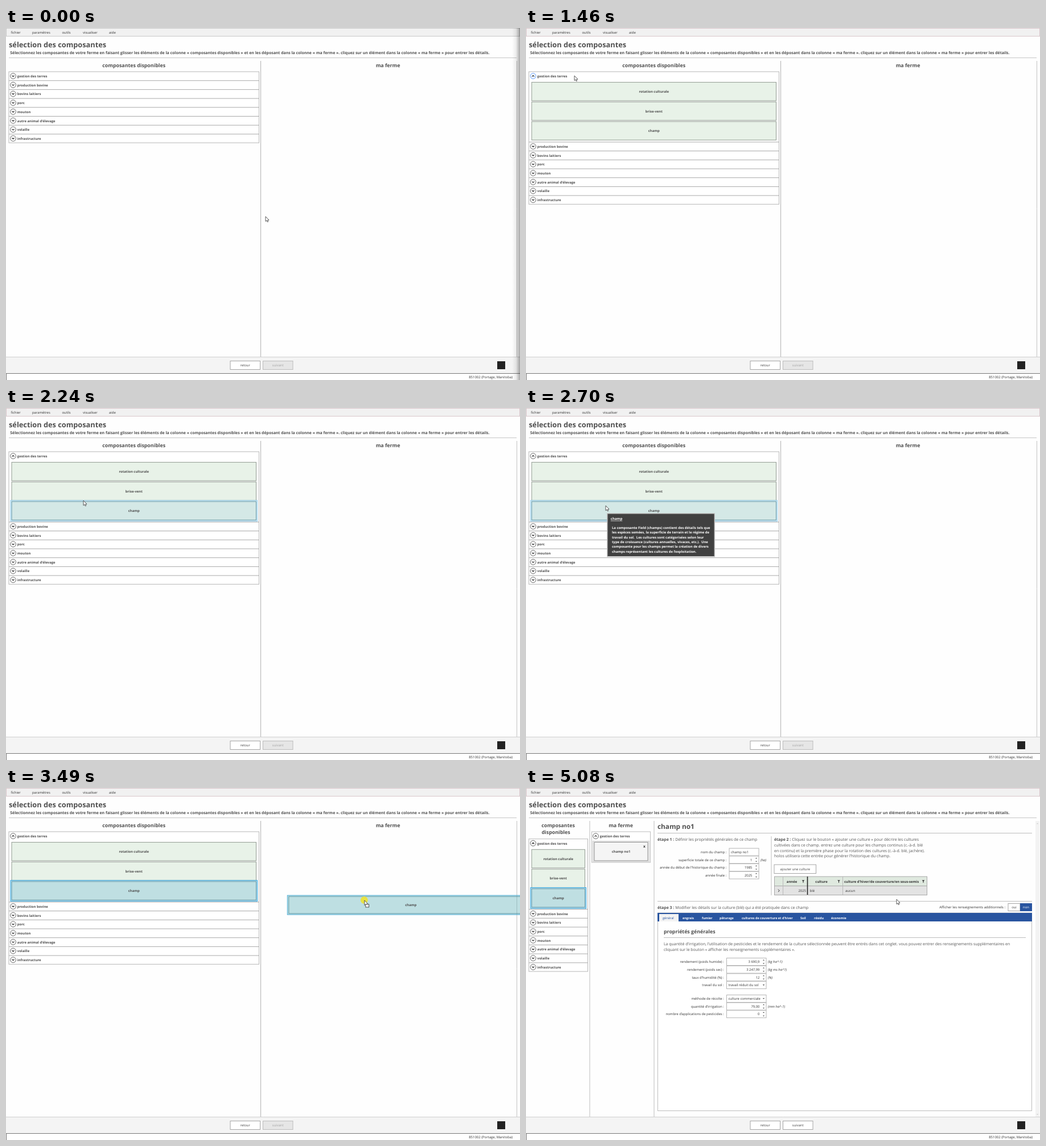
An HTML page with a canvas that plays this animation: 903x620 px, repeating every 6400 ms.

```html
<!DOCTYPE html>
<html lang="fr">
<head>
<meta charset="utf-8">
<title>Sélection des composantes</title>
<style>
html, body { margin: 0; width: 100%; height: 100%; overflow: hidden; background: #fff; }
canvas { display: block; width: 903px; height: 620px; }
</style>
</head>
<body>
<canvas id="stage"></canvas>
<script>
const W = 903, H = 620, LOOP = 6400;
const canvas = document.getElementById('stage');
const dpr = window.devicePixelRatio || 1;
canvas.width = W * dpr;
canvas.height = H * dpr;
const ctx = canvas.getContext('2d');
ctx.scale(dpr, dpr);
ctx.textRendering = 'geometricPrecision';
ctx.textBaseline = 'alphabetic';

const INK = '#505050', DARK = '#333', LINE = '#bdbdbd', BLUE = '#2955a0';
const PRESS = 1320, OPEN = 1400, TIP = 2700, GRAB = 2770, DRAG = 2900;
const RELEASE = 3950, DROP = 4550, IDLE = 4620, FORM = 5080;

// Bursts of motion: start, end, number of steps
const bursts = [[270, 850, 10], [920, 1460, 9], [1640, 2240, 10], [2300, 2440, 3], [2700, 3300, 10], [3360, 3630, 5]];
// Pointer path: time, x, y
const path = [
  [205, 456, 332], [850, 112, 111], [1050, 102, 94], [1380, 85, 84], [1590, 85, 84],
  [1970, 116, 122], [2240, 136, 163], [2440, 140, 172], [2850, 140, 172], [3030, 163, 171],
  [3100, 211, 171], [3300, 468, 189], [3490, 629, 198], [3630, 651, 196]
];

const groups = ['gestion des terres', 'production bovine', 'bovins laitiers', 'porc', 'mouton',
  'autre animal d’élevage', 'volaille', 'infrastructure'];
const parts = ['rotation culturale', 'brise-vent', 'champ'];

function snap(t) {
  let out = 0;
  for (const [start, end, n] of bursts) {
    if (t < start) break;
    const step = (end - start) / (n - 1);
    out = Math.min(end, start + Math.floor((t - start) / step + 0.1) * step);
  }
  return out;
}

function pointer(t) {
  if (t <= path[0][0]) return { x: path[0][1], y: path[0][2] };
  for (let i = 1; i < path.length; i++) {
    const [t0, x0, y0] = path[i - 1], [t1, x1, y1] = path[i];
    if (t > t1) continue;
    let p = (t - t0) / (t1 - t0);
    if (i === 1) p = p * p * (3 - 2 * p);
    return { x: x0 + (x1 - x0) * p, y: y0 + (y1 - y0) * p };
  }
  const last = path[path.length - 1];
  return { x: last[1], y: last[2] };
}

// y is the middle of the lower-case letters
function text(str, x, y, size = 5.95, { bold, italic, align = 'left', color = DARK } = {}) {
  ctx.font = `${italic ? 'italic ' : ''}${bold ? 700 : 400} ${size}px "Open Sans", "Noto Sans", sans-serif`;
  ctx.textAlign = align;
  ctx.fillStyle = color;
  ctx.fillText(str, x, y + size * 0.33);
  return ctx.measureText(str).width;
}

function line(x0, y0, x1, y1, color = LINE, width = 1) {
  ctx.strokeStyle = color;
  ctx.lineWidth = width;
  ctx.beginPath();
  ctx.moveTo(x0, y0);
  ctx.lineTo(x1, y1);
  ctx.stroke();
}

function box(x0, y0, x1, y1, fill, stroke, width = 1) {
  if (fill) {
    ctx.fillStyle = fill;
    ctx.fillRect(x0, y0, x1 - x0, y1 - y0);
  }
  if (stroke) {
    ctx.strokeStyle = stroke;
    ctx.lineWidth = width;
    ctx.strokeRect(x0, y0, x1 - x0, y1 - y0);
  }
}

function shape(points, fill, stroke, width = 0.8) {
  ctx.beginPath();
  points.forEach(([x, y]) => ctx.lineTo(x, y));
  ctx.closePath();
  if (fill) { ctx.fillStyle = fill; ctx.fill(); }
  if (stroke) { ctx.strokeStyle = stroke; ctx.lineWidth = width; ctx.stroke(); }
}

function disc(x, y, r, fill, stroke, width = 0.9) {
  ctx.beginPath();
  ctx.arc(x, y, r, 0, Math.PI * 2);
  if (fill) { ctx.fillStyle = fill; ctx.fill(); }
  if (stroke) { ctx.strokeStyle = stroke; ctx.lineWidth = width; ctx.stroke(); }
}

function triangle(x, y, r, dir, color = DARK) {
  shape([[x - r, y - dir * r / 2], [x + r, y - dir * r / 2], [x, y + dir * r / 2]], color);
}

function button(label, x0, y0, x1, y1, enabled = true) {
  box(x0, y0, x1, y1, enabled ? '#fff' : '#e6e6e6', enabled ? '#a6a6a6' : '#bdbdbd');
  text(label, (x0 + x1) / 2, (y0 + y1) / 2 + 0.3, 5.9, { align: 'center', color: enabled ? '#444' : '#a5a5a5' });
}

function groupHead(label, x, y, open, hot) {
  disc(x, y, 4.9, hot ? '#f3f9ff' : '#fff', hot ? '#5593ff' : '#555');
  const d = open ? -1 : 1;
  ctx.strokeStyle = '#222';
  ctx.lineWidth = 1.1;
  ctx.beginPath();
  ctx.moveTo(x - 2, y - d);
  ctx.lineTo(x, y + d);
  ctx.lineTo(x + 2, y - d);
  ctx.stroke();
  text(label, x + 7.3, y + 0.5, 5.93, { bold: true, color: INK });
}

function partCard(label, x0, y, x1, state) {
  if (state) {
    const picked = state === 'picked';
    box(x0 - 2, y - 2, x1 + 2, y + 34.5, picked ? '#cae8f6' : '#e4f3fa', picked ? '#26a0da' : '#8cc9e8');
  }
  const fill = { picked: '#bfdfe2', hover: '#d4e8e6' }[state] || '#e8f2e8';
  box(x0, y, x1, y + 32.5, fill, state ? '#5f94a3' : '#929b92');
  text(label, (x0 + x1) / 2, y + 16.5, 5.93, { bold: true, align: 'center', color: INK });
}

function partList(top, right, open, pos, stateOf) {
  const pitch = 15.7;
  const shift = open ? 108.2 : 0;
  const bottom = top + pitch * 8 + shift - 0.4;
  box(5, top, right, bottom, '#fff', '#b8b8b8');
  groups.forEach((name, i) => {
    const y = top + pitch * i + (i ? shift : 0);
    if (i) line(5, y, right, y, '#a9a9a9');
    const mid = y + 7.6;
    const hot = pos && pos.x < right && Math.abs(pos.y - mid) < 6;
    groupHead(name, 12.5, mid, open && !i, hot);
  });
  if (open) parts.forEach((name, i) => partCard(name, 10, top + 18.6 + i * 34.6, right - 5, stateOf(i)));
}

function frame(t) {
  const active = t >= PRESS;
  box(0, 0, W, H, '#fefefe');
  box(0.5, 0.5, W - 0.5, 14.5, '#f1f1f1', active ? '#d9c6ca' : '#c9c9c9');
  [['fichier', 8.5], ['paramètres', 46], ['outils', 98.5], ['visualiser', 135], ['aide', 181]]
    .forEach(([s, x]) => text(s, x, 8, 5.9));
  text('sélection des composantes', 5, 29.8, 12.78, { bold: true, color: INK });
  text('Sélectionnez les composantes de votre ferme en faisant glisser les éléments de la colonne « composantes disponibles » et en les déposant dans la colonne « ma ferme ». cliquez sur un élément dans la colonne « ma ferme » pour entrer les détails.',
    7.3, 43.5, 6.92, { bold: true, color: INK });
  line(5, 52.5, 897, 52.5, '#c6c6c6');

  box(0, 579, W, 608, '#f4f4f4');
  line(0, 579.5, W, 579.5, '#cfcfcf');
  box(0.5, 608.5, W + 1, H + 1, '#fff', '#777');
  button('retour', 394, 586.5, 446.5, 601.5);
  button('suivant', 451.5, 586.5, 504, 601.5, t >= FORM);
  box(863, 587, 877, 601, '#222');
  text('851002 (Portage, Manitoba)', 890, 615, 5.97, { align: 'right' });
}

function shadow() {
  const g = ctx.createLinearGradient(889, 0, W, 0);
  g.addColorStop(0, 'rgba(0,0,0,0)');
  g.addColorStop(0.5, 'rgba(0,0,0,.07)');
  g.addColorStop(1, 'rgba(0,0,0,.34)');
  box(889, 0, W, H, g);
}

function heading(str, x, y) {
  text(str, x, y, 8.82, { bold: true, align: 'center', color: INK });
}

function chooser(t, pos) {
  heading('composantes disponibles', 224.7, 65.8);
  heading('ma ferme', 671, 65.8);
  line(447.5, 58, 447.5, 579, '#bababa', 1.2);
  line(897.5, 58, 897.5, 579, '#c2c2c2');
  const stateOf = i => {
    if (t >= GRAB) return i === 2 ? 'picked' : '';
    return Math.floor((pos.y - 93.5) / 34.6) === i ? 'hover' : '';
  };
  partList(77, 444.5, t >= OPEN, t < GRAB ? pos : null, stateOf);
}

function tooltip() {
  box(142.8, 185.8, 331.3, 261.7, '#404040', '#c4c4c4', 1.4);
  const white = { bold: true, color: '#fff' };
  const w = text('champ', 148.8, 195.2, 6.05, white);
  line(148.8, 198.8, 148.8 + w, 198.8, '#fff', 0.7);
  ['La composante Field (champs) contient des détails tels que',
    'les espèces semées, la superficie de terrain et le régime de',
    'travail du sol.  Les cultures sont catégorisées selon leur',
    'type de croissance (cultures annuelles, vivaces, etc.).  Une',
    'composante pour les champs permet la création de divers',
    'champs représentant les cultures de l’exploitation.'
  ].forEach((s, i) => text(s, 151, 211.2 + i * 8.3, 5.89, white));
}

function ghost(x, y) {
  box(x, y, x + 434, y + 34, 'rgba(111,184,191,.45)', '#4fafd8');
  box(x + 2.5, y + 2, x + 431.5, y + 32, null, 'rgba(60,130,150,.75)');
  text('champ', x + 217, y + 17.2, 5.93, { bold: true, align: 'center', color: INK });
}

function arrow(x, y) {
  const pts = [[0, 0], [0, 8.6], [2, 6.9], [3.3, 9.7], [4.7, 9.1], [3.5, 6.4], [6, 6.2]];
  shape(pts.map(([a, b]) => [x + a, y + b]), '#fff', '#333');
}

function cursor(t, pos) {
  const { x, y } = pos;
  const pressed = (t >= PRESS && t < OPEN) || (t >= GRAB && t < RELEASE);
  if (pressed) disc(x - 0.5, y - 0.5, 6.4, 'rgba(240,228,40,.85)');
  const dragging = t >= DRAG && t < IDLE;
  if (dragging && x < 447) {
    disc(x, y - 0.5, 3.8, null, '#f4ecb0', 2);
    disc(x, y - 0.5, 3.8, null, '#8f8447', 0.8);
    line(x - 2.7, y - 3.2, x + 2.7, y + 2.2, '#8f8447', 0.9);
    return;
  }
  arrow(x, y);
  if (dragging) box(x + 2, y + 7, x + 7.8, y + 12, '#fff', '#444', 0.9);
}

function field(label, y, x0, x1, value, { kind = 'spin', unit } = {}) {
  text(label + ' :', x0 - 4.8, y + 0.3, 5.95, { align: 'right' });
  box(x0, y - 6.5, x1, y + 6.5, '#fff', '#b4b4b4');
  if (kind === 'spin') {
    text(value, x1 - 11.5, y + 0.3, 5.95, { align: 'right' });
    triangle(x1 - 4.5, y - 3, 1.5, -1);
    triangle(x1 - 4.5, y + 3.2, 1.5, 1);
  } else {
    text(value, x0 + 3, y + 0.3, 5.95);
    if (kind === 'combo') triangle(x1 - 4.5, y, 1.7, 1);
  }
  if (unit) text(unit, x1 + 3, y + 0.3, 5.95, { italic: true });
}

function step(n, str, x, y) {
  const w = text(`étape ${n} : `, x, y, 6.95, { bold: true, color: INK });
  text(str, x + w, y, 6.95, { color: '#555' });
}

function cropTable() {
  box(436, 156, 705, 172.5, '#dfe9df');
  box(436, 172.5, 705, 188.5, '#e3e3e3');
  box(436.5, 156, 704.5, 188.5, null, '#a9a9a9');
  line(436, 172.5, 705, 172.5, '#a9a9a9');
  [451.5, 556.5].forEach(x => line(x, 156, x, 188, '#b9b9b9'));
  line(494.5, 156, 494.5, 188, '#222', 1.6);
  const bold = { bold: true, color: DARK };
  text('année', 467, 164.8, 5.95, { ...bold, align: 'center' });
  text('culture', 519, 164.8, 5.95, { ...bold, align: 'center' });
  text('culture d’hiver/de couverture/en sous-semis', 559, 164.8, 5.95, bold);
  [487, 549.5, 698].forEach(x => {
    triangle(x, 163.5, 2.3, 1);
    line(x, 163, x, 167, DARK);
  });
  line(443, 178.5, 445.2, 180.8, DARK);
  line(445.2, 180.8, 443, 183, DARK);
  text('2025', 492, 181.2, 5.95, { align: 'right' });
  text('blé', 498.5, 181.2);
  text('aucun', 561, 181.2);
}

function tabs() {
  box(231, 220, 889, 235, BLUE);
  box(234, 222, 268, 235, '#f3f3f3');
  text('général', 240, 229, 5.7, { color: BLUE });
  [['engrais', 275], ['fumier', 309], ['pâturage', 340], ['cultures de couverture et d’hiver', 379],
    ['Soil', 482], ['résidu', 506], ['économie', 536]
  ].forEach(([s, x]) => text(s, x, 229, 5.5, { bold: true, color: '#fff' }));
}

function form() {
  heading('composantes', 56.5, 66);
  heading('disponibles', 52.5, 78.3);
  partList(89.7, 108.5, true, null, i => i === 2 ? 'picked' : '');
  line(112, 58, 112, 579);
  heading('ma ferme', 166.5, 66);
  box(115.5, 77, 218.5, 131, '#fff', LINE);
  groupHead('gestion des terres', 122.5, 84.7, true);
  box(117.5, 93.5, 216.5, 130, '#ededed', '#d0d0d0');
  box(120, 95.5, 214, 128, '#f5f5f5', '#8d8d8d');
  text('champ no1', 167, 112, 5.93, { bold: true, align: 'center', color: INK });
  text('x', 208, 103, 6.5, { bold: true, align: 'center' });
  line(225, 58, 225, 579);

  text('champ no1', 231, 68.2, 11.8, { bold: true, color: INK });
  line(231, 79.5, 889, 79.5);
  step(1, 'Définir les propriétés générales de ce champ', 231, 90.7);
  field('nom du champ', 112.7, 357, 409, 'champ no1', { kind: 'text' });
  field('superficie totale de ce champ', 126.4, 357, 409, '1', { unit: '(ha)' });
  field('année du début de l’historique du champ', 140, 357, 409, '1985');
  field('année finale', 153.6, 357, 409, '2025');

  line(431, 85, 431, 189);
  step(2, 'Cliquez sur le bouton « ajouter une culture » pour décrire les cultures', 436, 90.7);
  ['cultivées dans ce champ. entrez une culture pour les champs continus (c.-à-d. blé',
    'en continu) et la première phase pour la rotation des cultures (c.-à-d. blé, jachère).',
    'holos utilisera cette entrée pour générer l’historique du champ.'
  ].forEach((s, i) => text(s, 436, 100.6 + i * 9.7, 6.95, { color: '#555' }));
  button('ajouter une culture', 436, 135, 509.5, 150.5);
  cropTable();

  line(231, 199.5, 889, 199.5);
  step(3, 'Modifier les détails sur la culture (blé) qui a été pratiquée dans ce champ', 231, 210.7);
  text('Afficher les renseignements additionnels :', 842, 210.5, 5.95, { align: 'right' });
  button('oui', 847, 203.5, 868, 216.5);
  box(868, 203, 889, 217, BLUE);
  text('non', 878.5, 210.4, 5.9, { align: 'center', color: '#fff' });

  box(231.5, 220, 888.5, 568.5, '#fff', LINE);
  tabs();
  text('propriétés générales', 242, 253, 8.82, { bold: true, color: INK });
  line(242, 263.5, 878, 263.5);
  text('La quantité d’irrigation, l’utilisation de pesticides et le rendement de la culture sélectionnée peuvent être entrés dans cet onglet. vous pouvez entrer des renseignements supplémentaires en',
    242, 274.8, 6.95, { color: '#555' });
  text('cliquant sur le bouton « afficher les renseignements supplémentaires ».', 242, 284.6, 6.95, { color: '#555' });
  [['rendement (poids humide)', 306, '3 690,9', { unit: '(kg ha^-1)' }],
    ['rendement (poids sec)', 319.7, '3 247,99', { unit: '(kg ms ha^1)' }],
    ['taux d’humidité (%)', 333.4, '12', { unit: '(%)' }],
    ['travail du sol', 347.1, 'travail réduit du sol', { kind: 'combo' }],
    ['méthode de récolte', 371, 'culture commerciale', { kind: 'combo' }],
    ['quantité d’irrigation', 384.6, '79,00', { unit: '(mm ha^-1)' }],
    ['nombre d’applications de pesticides', 398.2, '0', {}]
  ].forEach(([label, y, value, opt]) => field(label, y, 352.5, 422, value, opt));

  box(895, 58, 902, 579, '#f3f3f3');
  triangle(898.5, 62.5, 1.7, -1, '#c4c4c4');
  triangle(898.5, 575, 1.7, 1, '#c4c4c4');
}

function draw(t) {
  const at = snap(t), pos = pointer(at);
  frame(t);
  if (t >= FORM) form();
  else chooser(t, pos);
  if (t >= TIP && t < GRAB) tooltip();
  if (t >= DRAG && t < DROP) {
    // The dragged copy trails the pointer until it rests
    const p = at < 3630 ? pointer(at - 7) : pos;
    ghost(p.x - 133, p.y - 8.8);
  }
  if (t < PRESS) shadow();
  cursor(t, pos);
}

const begin = performance.now();
function tick() {
  draw((performance.now() - begin) % LOOP);
  requestAnimationFrame(tick);
}
tick();
</script>
</body>
</html>
```
